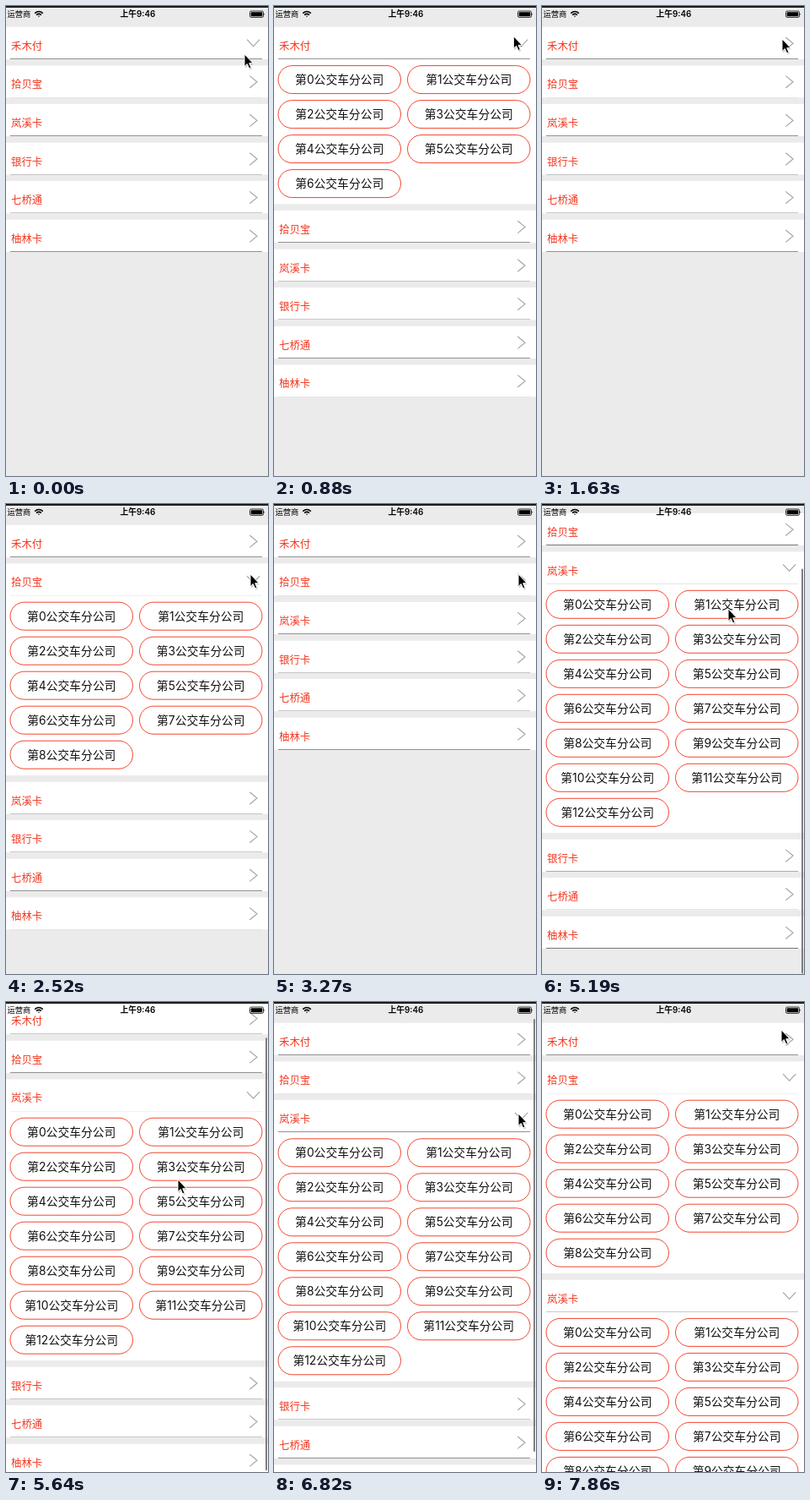
Write an HTML page that moves like this. It is 311 px wide and 556 px high and loops after 8000 ms.

```html
<!DOCTYPE html>
<html lang="zh">
<head>
<meta charset="utf-8">
<title>Accordion list</title>
<style>
html, body { margin: 0; width: 100%; height: 100%; overflow: hidden; background: #ebebeb; }
#stage { display: block; width: 100vw; height: 100vh; }
text { font-family: Inter, "Noto Sans CJK SC", "Noto Sans CJK", sans-serif; }
.title { font-size: 12.4px; fill: #f4361e; }
.pill { fill: #fff; stroke: #f4452f; stroke-width: 1; }
.label { font-size: 13.8px; fill: #111; text-anchor: middle; }
.arrow { fill: none; stroke: #a6a6a6; stroke-width: 1.2; }
</style>
</head>
<body>
<svg id="stage" viewBox="0 0 311 556">
  <rect width="311" height="556" fill="#ebebeb"/>
  <g id="list"></g>
  <rect id="bar" x="308" width="2" rx="1" fill="#7d7d7d"/>
  <g id="status">
    <rect width="311" height="2" fill="#1c1c1c"/>
    <text x="1.5" y="13.4" font-size="9.3">运营商</text>
    <g fill="none" stroke="#000" stroke-width="1.6">
      <path d="M34.2 8.6Q39 4.4 43.8 8.6M36.1 10.6Q39 8.2 41.9 10.6"/>
      <path d="M37.7 11.7H40.3L39 13.1Z" fill="#000" stroke="none"/>
    </g>
    <text x="156.3" y="13.4" font-size="9.8" font-weight="600" text-anchor="middle">上午9:46</text>
    <rect x="289.5" y="6" width="16" height="7.4" rx="1.6" fill="none" stroke="#000" stroke-width=".8"/>
    <rect x="290.7" y="7.2" width="13.6" height="5" rx=".6"/>
    <path d="M306.4 8.4Q307.8 9.7 306.4 11Z"/>
  </g>
  <g id="cursor">
    <path d="M1 2V16.5L4.3 13.4 6.6 18.6 9 17.6 6.8 12.5H11Z" fill="#000" opacity=".2"/>
    <path d="M0 0V14.6L3.3 11.5 5.6 16.9 8 15.9 5.7 10.7H10.2Z" fill="#000" stroke="#fff" stroke-width="1"/>
  </g>
</svg>
<script>
const LOOP = 8000, TICK = 148.2;
const TOP = 24.6, HEAD = 38.4, PITCH = 45.6, PILL_ROW = 41;
const RIGHT = "M289.3 12.4L298 19.6 289.3 26.8", DOWN = "M286 15L293.6 23 301.2 15";

// opens: [tick the arrow turns, tick the body grows, tick it closes]
const DATA = [
  { name: "禾木付", count: 7, opens: [[0, 3, 11]] },
  { name: "拾贝宝", count: 9, opens: [[16, 16, 22], [48, 48, 99]] },
  { name: "岚溪卡", count: 13, opens: [[27, 27, 99]] },
  { name: "银行卡", count: 0, opens: [] },
  { name: "七桥通", count: 0, opens: [] },
  { name: "柚林卡", count: 0, opens: [] }
];

// [tick, x, y]
const POINTER = [
  [0, 283, 57], [2, 283, 57], [3, 283, 51], [6, 285, 28], [9, 285, 39], [12, 285, 39],
  [13, 288, 62], [14, 290, 83], [23, 290, 83], [24, 290, 100], [26, 290, 140],
  [29, 289, 140], [31, 258, 185], [32, 238, 205], [33, 228, 178], [34, 222, 142],
  [35, 221, 124], [36, 212, 160], [38, 204, 210], [39, 228, 180], [40, 292, 113],
  [41, 292, 113], [42, 292, 110], [43, 291, 107], [44, 291, 107], [46, 290, 132],
  [47, 290, 102], [48, 290, 88], [50, 290, 86], [52, 277, 36], [53, 284, 33]
];
// [tick, offset]
const SCROLL = [[31, 0], [32, 8], [33, 30], [34, 50], [35, 59.5], [36, 45], [37, 30],
  [38, 24.6], [44, 24.6], [46, 0]];

const $ = id => document.getElementById(id);

function add(parent, tag, attrs, text) {
  const el = document.createElementNS("http://www.w3.org/2000/svg", tag);
  for (const key in attrs) el.setAttribute(key, attrs[key]);
  if (text) el.textContent = text;
  return parent.appendChild(el);
}

function sample(keys, k) {
  if (k <= keys[0][0]) return keys[0].slice(1);
  const i = keys.findIndex(key => key[0] > k);
  if (i < 0) return keys[keys.length - 1].slice(1);
  const a = keys[i - 1], b = keys[i], f = (k - a[0]) / (b[0] - a[0]);
  return a.slice(1).map((v, n) => v + (b[n + 1] - v) * f);
}

function buildSection({ name, count, opens }) {
  const box = add($("list"), "svg", { width: 311, overflow: "hidden" });
  add(box, "rect", { width: 311, height: "100%", fill: "#fff" });
  add(box, "text", { x: 6, y: 27.3, class: "title" }, name);
  const arrow = add(box, "path", { class: "arrow" });
  const pills = add(box, "g", {});
  for (let i = 0; i < count; i++) {
    const x = i % 2 ? 158.5 : 5, y = 46 + (i >> 1) * PILL_ROW;
    add(pills, "rect", { class: "pill", x, y, width: 145.5, height: 33, rx: 16.5 });
    add(pills, "text", { class: "label", x: x + 72.75, y: y + 21.7 }, `第${i}公交车分公司`);
  }
  const line = add($("list"), "rect", { x: 5, width: 299, height: 1, fill: "#777" });
  const full = count ? Math.ceil(count / 2) * PILL_ROW + 7.6 : 0;
  return { box, arrow, pills, line, full, opens };
}

const sections = DATA.map(buildSection);

function render(ms) {
  const k = Math.min(53, Math.floor((ms + 6) / TICK));
  const [offset] = sample(SCROLL, k);
  let y = TOP - offset;
  for (const s of sections) {
    const span = s.opens.find(o => k >= o[0] && k < o[2]);
    const grown = !span || k < span[1] ? 0 : k === span[1] ? 0.6 : 1;
    const body = s.full * grown;
    s.box.setAttribute("y", y);
    s.box.setAttribute("height", HEAD + body);
    s.arrow.setAttribute("d", span ? DOWN : RIGHT);
    s.pills.setAttribute("opacity", grown);
    // a hairline fades as it straddles two pixel rows
    const ly = y + 37.8, frac = ly - Math.floor(ly);
    s.line.setAttribute("y", Math.floor(ly));
    s.line.setAttribute("opacity", Math.max(0.1, 1 - 2 * Math.abs(frac - 0.5)));
    y += PITCH + body;
  }

  const barTop = 20 + Math.min(offset, 30) * 0.9 + Math.max(0, offset - 30);
  const bar = $("bar");
  bar.setAttribute("y", barTop);
  bar.setAttribute("height", Math.min(512, 555.5 - barTop));
  bar.setAttribute("opacity", (k >= 32 && k < 40) || (k >= 45 && k < 48) ? 1 : 0);

  $("cursor").setAttribute("transform", `translate(${sample(POINTER, k)})`);
}

const start = performance.now();
function loop() {
  render((performance.now() - start) % LOOP);
  requestAnimationFrame(loop);
}
loop();
</script>
</body>
</html>
```
